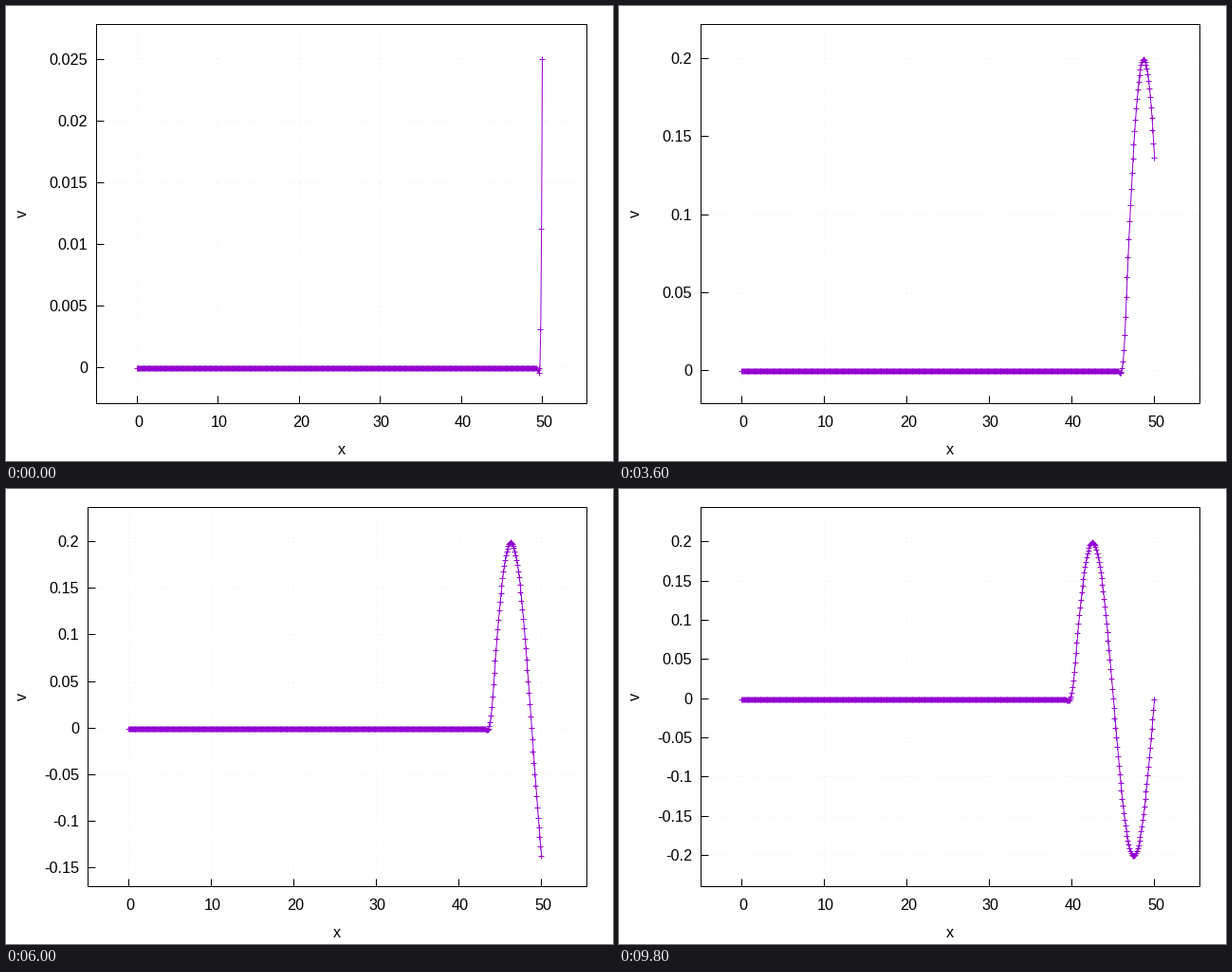
These frames come from a looping animation (640 by 480 pixels, 10 s). A matplotlib script:

```python
import math

import numpy as np
import matplotlib.pyplot as plt
from matplotlib.animation import FuncAnimation

W, H, DPI = 640, 480, 100
PX = 72 / DPI                       # points per pixel
FRAMES, INTERVAL = 50, 200
TOP, BOTTOM, RIGHT = 19.5, 419.5, 612.5
PURPLE, GRID = "#9400d3", "#e4e4e4"
AMP, PERIOD, DX = 0.2, 10.0, 0.1
STEP_T, SUBSTEPS = 0.2, 20          # model time per frame

plt.rcParams["font.family"] = "Liberation Sans"
plt.rcParams["font.size"] = 16.2 * PX

xs = np.linspace(0, 50, 501)


def drive(t):
    return AMP * math.sin(2 * math.pi * t / PERIOD)


def rate(v):
    """Left-moving wave, third-order upwind-biased differences."""
    r = np.zeros_like(v)
    r[1:-2] = (6 * v[2:-1] - v[3:] - 3 * v[1:-2] - 2 * v[:-3]) / (6 * DX)
    r[-2] = (v[-1] - v[-3]) / (2 * DX)
    return r


def simulate():
    """Runge-Kutta steps; the driven end is held during each step."""
    v, dt = np.zeros_like(xs), STEP_T / SUBSTEPS
    states = []
    for step in range(1, FRAMES * SUBSTEPS + 1):
        a = rate(v)
        b = rate(v + dt / 2 * a)
        c = rate(v + dt / 2 * b)
        d = rate(v + dt * c)
        v = v + dt / 6 * (a + 2 * b + 2 * c + d)
        v[-1] = drive(step * dt)
        if step % SUBSTEPS == 0:
            states.append(v)
    return states


def padded(lo, hi):
    """Widen a range by a tenth, first below and then above."""
    lo -= 0.1 * (hi - lo)
    return lo, hi + 0.1 * (hi - lo)


def tick_step(span, guide=20):
    power = 10 ** math.floor(math.log10(span))
    slots = guide * power / span
    for limit, step in ((40, 0.05), (20, 0.1), (10, 0.2), (4, 0.5), (1, 1)):
        if slots > limit:
            return step * power
    return 2 * power


def ticks(lo, hi, step):
    return [k * step for k in range(math.ceil(lo / step), math.floor(hi / step) + 1)]


def label(value):
    return f"{round(value, 6):g}"


def crisp(p):
    """Centre of the pixel that holds p."""
    return math.floor(p) + 0.5


waves = simulate()
X_LO, X_HI = padded(0, 50)

fig = plt.figure(figsize=(W / DPI, H / DPI), dpi=DPI, facecolor="white")
ax = fig.add_axes([0, 0, 1, 1])


def stroke(x, y, color="black", width=1.0, **kw):
    ax.plot(x, y, color=color, lw=width * PX, snap=False, **kw)


def draw(i):
    ax.clear()
    ax.set(xlim=(0, W), ylim=(H, 0))
    ax.axis("off")

    v = waves[i]
    lo, hi = padded(v.min(), v.max())
    y_ticks = ticks(lo, hi, tick_step(hi - lo))
    x_ticks = ticks(X_LO, X_HI, 10)
    digits = max(len(label(t).lstrip("-")) for t in y_ticks)
    left = 86.5 + 9 * (digits - 4)

    def to_x(x):
        return left + (x - X_LO) / (X_HI - X_LO) * (RIGHT - left)

    def to_y(y):
        return BOTTOM - (y - lo) / (hi - lo) * (BOTTOM - TOP)

    dots = dict(color=GRID, width=0.6, dashes=(1.5, 6), zorder=1)
    tick = dict(solid_capstyle="butt", zorder=2)
    for t in y_ticks:
        y = crisp(to_y(t))
        stroke([left, RIGHT], [y, y], **dots)
        stroke([left, left + 8], [y, y], **tick)
        ax.text(left - 9.3, y + 5.5, label(t), ha="right", va="baseline")
    for t in x_ticks:
        x = crisp(to_x(t))
        stroke([x, x], [TOP, BOTTOM], **dots)
        stroke([x, x], [BOTTOM, BOTTOM - 8], **tick)
        ax.text(x + 1.4, 444.5, label(t), ha="center", va="baseline")

    px, py = to_x(xs), to_y(v)
    stroke(px, py, PURPLE, zorder=3)
    # markers are rounded to whole pixels, so aim half a pixel back
    ax.plot(px - 0.5, py + 0.5, "+", color=PURPLE, ms=6 * PX, mew=PX, zorder=3)
    stroke([left, RIGHT, RIGHT, left, left], [TOP, TOP, BOTTOM, BOTTOM, TOP],
           solid_joinstyle="miter", solid_capstyle="projecting", zorder=4)

    ax.text((left + RIGHT) / 2 - 0.5, 473, "x", ha="center", va="baseline")
    ax.text(22, 219, "v", ha="center", va="baseline",
            rotation=90, rotation_mode="anchor")
    return []


anim = FuncAnimation(fig, draw, frames=FRAMES, init_func=lambda: draw(0),
                     interval=INTERVAL, repeat=True, repeat_delay=0)
plt.show()
```
